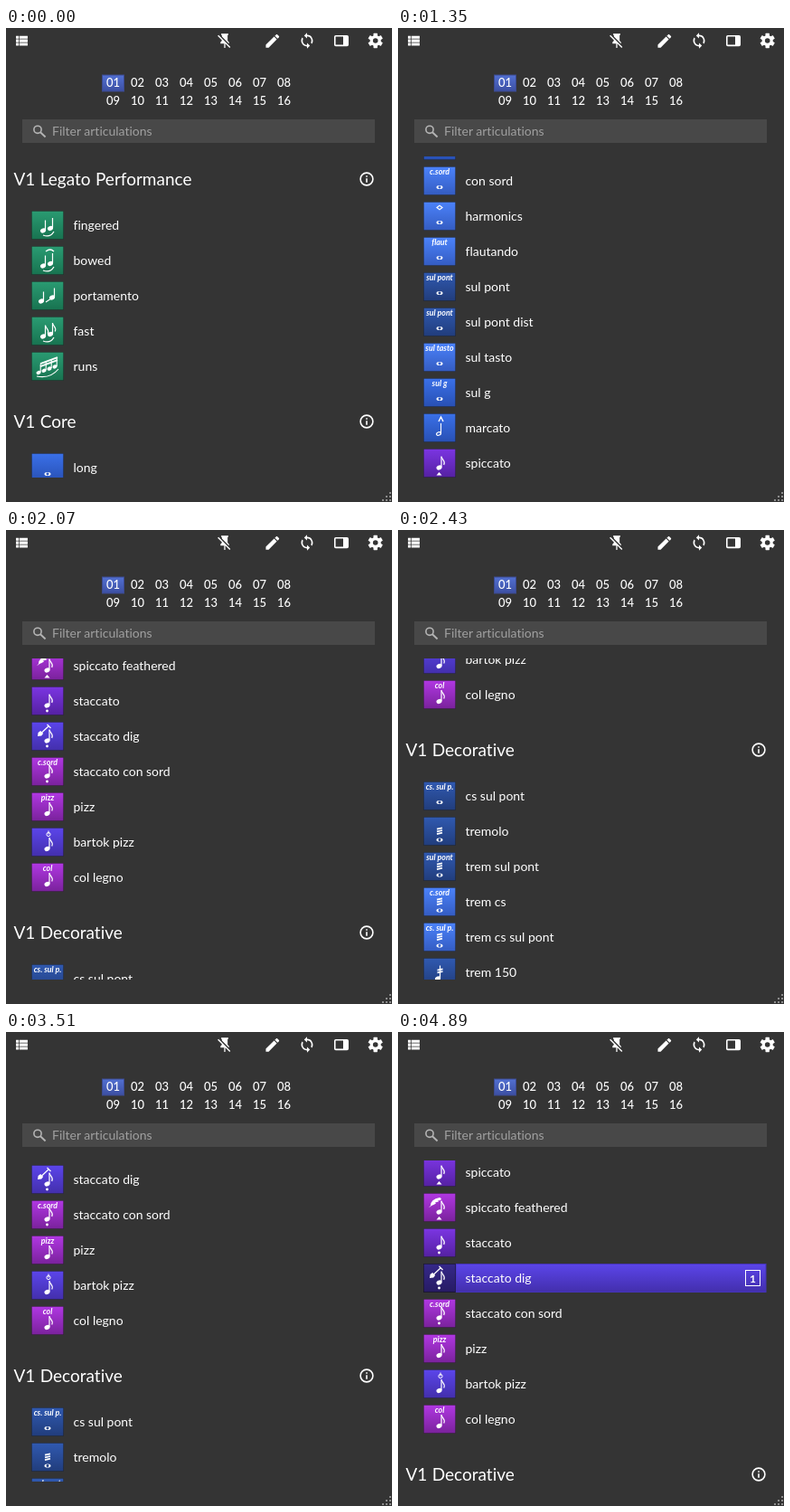
Write an HTML page that moves like this. It is 427 by 524 pixels and loops after 6.32 s.

```html
<!DOCTYPE html>
<html lang="en">
<head>
<meta charset="utf-8">
<title>Articulations</title>
<style>
  html, body { margin: 0; width: 100%; height: 100%; overflow: hidden; background: #343434; }
  svg { display: block; width: 427px; height: 524px; }
  text { font-family: Lato, "Noto Sans", sans-serif; fill: #fff; font-variant-ligatures: none; }
  .row { font-size: 14px; }
  .head { font-size: 19px; word-spacing: .5px; }
  .num { font-size: 13px; font-weight: 500; text-anchor: middle; }
  .tag { font-size: 8.8px; font-weight: 700; font-style: italic; text-anchor: middle; }
  .line { fill: none; stroke: #fff; }
</style>
</head>
<body>
<svg id="stage" viewBox="0 0 427 524"></svg>
<script>
const LOOP = 6320;

const colors = {
  green: ['#2a9b72', '#187350'],
  blue: ['#3a70e8', '#2850b4'],
  sky: ['#4b82fa', '#345cc2'],
  navy: ['#3059b0', '#213d7c'],
  violet: ['#7b35e2', '#5521a2'],
  pink: ['#b037e2', '#7a229c'],
  indigo: ['#5b45ea', '#432fac'],
  pick: ['#5270d2', '#3c4fa2']
};

// Glyph helpers; the origin is the middle of an icon.
const line = (d, w = 1.1) => `<path class="line" d="${d}" stroke-width="${w}"/>`;
const fill = d => `<path d="${d}" fill="#fff"/>`;
const oval = (x, y, rx, ry, a) =>
  `<ellipse cx="${x}" cy="${y}" rx="${rx}" ry="${ry}" fill="#fff" transform="rotate(${a} ${x} ${y})"/>`;
const tag = s => `<text class="tag" y="-7">${s}</text>`;
const dot = (x, y, r = 1.4) => `<circle cx="${x}" cy="${y}" r="${r}" fill="#fff"/>`;
const quarter = (x, y, h = 11) => oval(x, y, 3.1, 2.4, -25) + line(`M${x + 2.5} ${y - .5}v${-h}`, 1.2);
const eighth = (x, y, h = 12) => quarter(x, y, h) +
  line(`M${x + 2.6} ${y - h}c.4 3.4 5 4.4 2.6 9`, 1.2);
const whole = (y = 7) => fill(`M-3.5 ${y}a3.5 2.1 0 1 0 7 0a3.5 2.1 0 1 0-7 0m2 -.3a1.3 1.2 0 1 1 3 .6a1.3 1.2 0 1 1-3-.6`);
const slur = line('M-5 11q8 3 12-4', 1.2);
const pair = quarter(-5, 6) + quarter(3, 3.5);
const slashes = (x, y, n) =>
  Array.from({ length: n }, (_, i) => line(`M${x - 3} ${y + i * 2.7 + .7}l6-1.4`, 1.7)).join('');
const tremolo = slashes(0, -3, 3) + whole(9.5);
const shortNote = eighth(-.5, 5);
const staccato = shortNote + dot(-.5, 11);
const spiccato = shortNote + fill('M-3.5 13.5l3-3.5 3 3.5z');
const lowNote = eighth(-.5, 7.5);
const feather = fill('M-10-2q0-7 10-9q3 1 1 3l-3 .6 1 .8-4 1 1 1q-3 2.4-6 2.6z') + line('M-11-.5l5-5', .9);
const shovel = fill('M-11 0l.6-4 2.6-2 3 3-2 2.6z') + line('M-6.500-4l8-7.500M-.5-13l4 4', 1.2);
const beams = [0, 3, 6].map(y => line(`M-4 ${y - 6}l12-4`, 1.7)).join('');
const trill = oval(-6, 8, 2.8, 2.1, -25) + oval(6, 4, 2.8, 2.1, -25) +
  line('M-3.7 7.5v-14M8.3 3.5v-14') + beams;
const flatTrill = trill + line('M0 3v8q4-3 3-4.5t-3 .5', 1);
const run = [0, 1, 2, 3].map(i =>
  oval(-10 + i * 6, 7 - i * 2.2, 2.6, 2, -25) + line(`M${-7.8 + i * 6} ${6.5 - i * 2.2}v-9`)).join('') +
  line('M-8-2.8l19-7M-8 .2l19-7', 1.8) + line('M-12 11q15 3 24-8', 1.1);

const sections = [
  ['V1 Legato Performance', [
    ['fingered', 'green', pair + slur],
    ['bowed', 'green', pair + slur + line('M-2-10q5-4 9 0', 1.2)],
    ['portamento', 'green', quarter(-7, 6, 10) + quarter(5, 2, 10) + line('M-2 7l6-4')],
    ['fast', 'green', eighth(-5, 6) + eighth(3, 3.5) + slur],
    ['runs', 'green', run]
  ]],
  ['V1 Core', [
    ['long', 'blue', whole()],
    ['con sord', 'sky', tag('c.sord') + whole()],
    ['harmonics', 'sky', line('M-3-9.5l3-2.2 3 2.2-3 2.2z') + whole()],
    ['flautando', 'sky', tag('flaut') + whole()],
    ['sul pont', 'navy', tag('sul pont') + whole()],
    ['sul pont dist', 'navy', tag('sul pont') + whole()],
    ['sul tasto', 'sky', tag('sul tasto') + whole()],
    ['sul g', 'blue', tag('sul g') + whole()],
    ['marcato', 'blue', line('M-1-7l2.5-5 2.5 5', 1.4) + line('M1.5 6v-11') +
      '<ellipse cx="-1" cy="6.5" rx="2.5" ry="1.7" class="line" stroke-width="1.2" transform="rotate(-25 -1 6.5)"/>'],
    ['spiccato', 'violet', spiccato],
    ['spiccato feathered', 'pink', feather + spiccato],
    ['staccato', 'violet', staccato],
    ['staccato dig', 'indigo', shovel + staccato],
    ['staccato con sord', 'pink', tag('c.sord') + staccato],
    ['pizz', 'pink', tag('pizz') + lowNote],
    ['bartok pizz', 'indigo', '<circle cx="1" cy="-8.5" r="2.1" class="line"/>' + line('M1-12.5v4') + lowNote],
    ['col legno', 'pink', tag('col') + lowNote]
  ]],
  ['V1 Decorative', [
    ['cs sul pont', 'navy', tag('cs. sul p.') + whole()],
    ['tremolo', 'navy', tremolo],
    ['trem sul pont', 'navy', tag('sul pont') + tremolo],
    ['trem cs', 'sky', tag('c.sord') + tremolo],
    ['trem cs sul pont', 'sky', tag('cs. sul p.') + tremolo],
    ['trem 150', 'navy', quarter(-2, 7, 14) + slashes(.5, -3, 2)],
    ['trem 180', 'navy', quarter(-2, 7, 14) + slashes(.5, -3, 2)],
    ['trill m2', 'blue', flatTrill],
    ['trill M2', 'blue', trill],
    ['trill m3', 'blue', flatTrill],
    ['trill M3', 'blue', trill]
  ]]
];

const info = y => `<g transform="translate(399 ${y})"><circle r="6.9" class="line" stroke-width="1.6"/>
  <path d="M-.8-3.8h1.6v1.6h-1.6zM-.8-.8h1.6v4.6h-1.6z" fill="#fff"/></g>`;

const picked = `<g class="sel"><rect x="18" y="-15.5" width="343" height="31" fill="url(#indigo)" stroke="#4534b8"/>
  <rect x="-18" y="-16" width="36" height="32" fill="#000" opacity=".42"/></g>`;
const badge = `<g class="sel"><rect x="338.5" y="-8.5" width="16" height="17" class="line"/>
  <text x="346.5" y="4.5" font-size="12" font-weight="700" text-anchor="middle">1</text></g>`;

function row([name, color, glyph], y) {
  const on = name === 'staccato dig';
  return `<g transform="translate(46 ${y})">
    <rect x="-17.5" y="-15.5" width="35" height="31" fill="url(#${color})" stroke="#000" stroke-opacity=".2"/>
    ${on ? picked : ''}${glyph}<text class="row" x="28.5" y="5">${name}</text>${on ? badge : ''}</g>`;
}

function list() {
  let y = 167, out = '';
  for (const [title, rows] of sections) {
    out += `<text class="head" x="8.5" y="${y + 7}">${title}</text>` + info(y);
    y += 51;
    for (const r of rows) { out += row(r, y); y += 39; }
    y += 22;
  }
  return out;
}

function numbers() {
  let out = '<rect x="106.5" y="52" width="24" height="18" fill="url(#pick)" stroke="#3c4a90"/>';
  for (let i = 0; i < 16; i++)
    out += `<text class="num" x="${118.5 + i % 8 * 27}" y="${i < 8 ? 65 : 85}">${String(i + 1).padStart(2, '0')}</text>`;
  return out;
}

const icon = (x, y, s, d) => `<path transform="translate(${x} ${y}) scale(${s})" d="${d}" fill="#fff"/>`;
const teeth = [0, 60, 120].map(a =>
  `<rect x="-2.2" y="-8.2" width="4.4" height="16.4" rx=".6" fill="#fff" transform="rotate(${a})"/>`).join('');

const toolbar =
  icon(8, 5, .76, 'M4 14h4v-4H4zm0 5h4v-4H4zM4 9h4V5H4zm5 5h12v-4H9zm0 5h12v-4H9zM9 5v4h12V5z') +
  icon(232.5, 4.6, .79, 'M2 5.3L3.3 4 20 20.7 18.7 22l-5.9-5.9V22h-1.6v-6H6v-2l2-2v-.7zM16 12l2 2v2h-.2L8 6.2V4H7V2h10v2h-1z') +
  icon(285, 4.5, .82, 'M3 17.2V21h3.8L17.8 9.9l-3.7-3.7zM20.7 7c.4-.4.4-1 0-1.4l-2.3-2.3c-.4-.4-1-.4-1.4 0l-1.9 1.8 3.8 3.8z') +
  icon(323.4, 4.4, .8, 'M12 4V1L8 5l4 4V6a6 6 0 0 1 5.3 8.8l1.5 1.5A8 8 0 0 0 12 4zm0 14a6 6 0 0 1-5.3-8.8L5.2 7.7A8 8 0 0 0 12 20v3l4-4-4-4z') +
  '<rect x="363.8" y="8.8" width="14.4" height="10.6" rx="1" class="line" stroke-width="1.6"/>' +
  '<rect x="373" y="9" width="5" height="10" fill="#fff"/>' +
  `<g transform="translate(408.7 14)">${teeth}<circle r="6.1" fill="#fff"/><circle r="2.8" fill="#343434"/></g>`;

const search = `<rect x="18" y="101" width="390" height="26" fill="#484848"/>
  <circle cx="35" cy="112.3" r="4.1" fill="none" stroke="#b4b4b4" stroke-width="1.6"/>
  <path d="M38 115.3l5.6 5.2" stroke="#b4b4b4" stroke-width="1.9"/>
  <text class="row" x="51" y="119" style="fill:#a0a0a0">Filter articulations</text>`;

let grip = '';
for (let r = 0; r < 3; r++)
  for (let c = 0; c <= r; c++)
    grip += `<rect x="${424 - c * 4}" y="${513 + r * 4}" width="2" height="2" fill="#8c8c8c"/>`;

const defs = Object.entries(colors).map(([id, [a, b]]) =>
  `<linearGradient id="${id}" x2="0" y2="1"><stop stop-color="${a}"/><stop offset="1" stop-color="${b}"/></linearGradient>`).join('');

const stage = document.getElementById('stage');
stage.innerHTML = `<defs>${defs}<clipPath id="view"><rect y="142" width="427" height="355"/></clipPath></defs>
  <rect width="427" height="524" fill="#343434"/>
  ${toolbar}${numbers()}${search}
  <g clip-path="url(#view)"><g id="list">${list()}</g></g>${grip}`;

// Scroll keys: time, offset, speed in px per ms.
const keys = [
  [810, 0, .5], [1350, 356, .58], [2070, 726, .51], [2790, 1092, .3],
  [2910, 1110, 0], [3510, 791, -.36], [4170, 682, 0]
];

function scrollAt(t) {
  if (t <= keys[0][0]) return 0;
  const i = keys.findIndex(k => t < k[0]);
  if (i < 0) return keys[keys.length - 1][1];
  const [t0, y0, v0] = keys[i - 1], [t1, y1, v1] = keys[i];
  const d = t1 - t0, u = (t - t0) / d, w = 1 - u;
  return y0 * w * w * (1 + 2 * u) + y1 * u * u * (3 - 2 * u) + d * u * w * (v0 * w - v1 * u);
}

const listEl = document.getElementById('list');
const sel = document.querySelectorAll('.sel');
const start = performance.now();

function draw() {
  const t = Math.max(0, performance.now() - start) % LOOP;
  const tick = 870 + 60 * Math.floor((t - 870) / 60);
  listEl.setAttribute('transform', `translate(0 ${-Math.round(scrollAt(tick))})`);
  const step = Math.floor((t - 4600) / 72.5) + 1;
  const shown = Math.min(5, Math.max(0, step)) / 5;
  sel.forEach(e => e.setAttribute('opacity', shown));
  requestAnimationFrame(draw);
}
draw();
</script>
</body>
</html>
```
